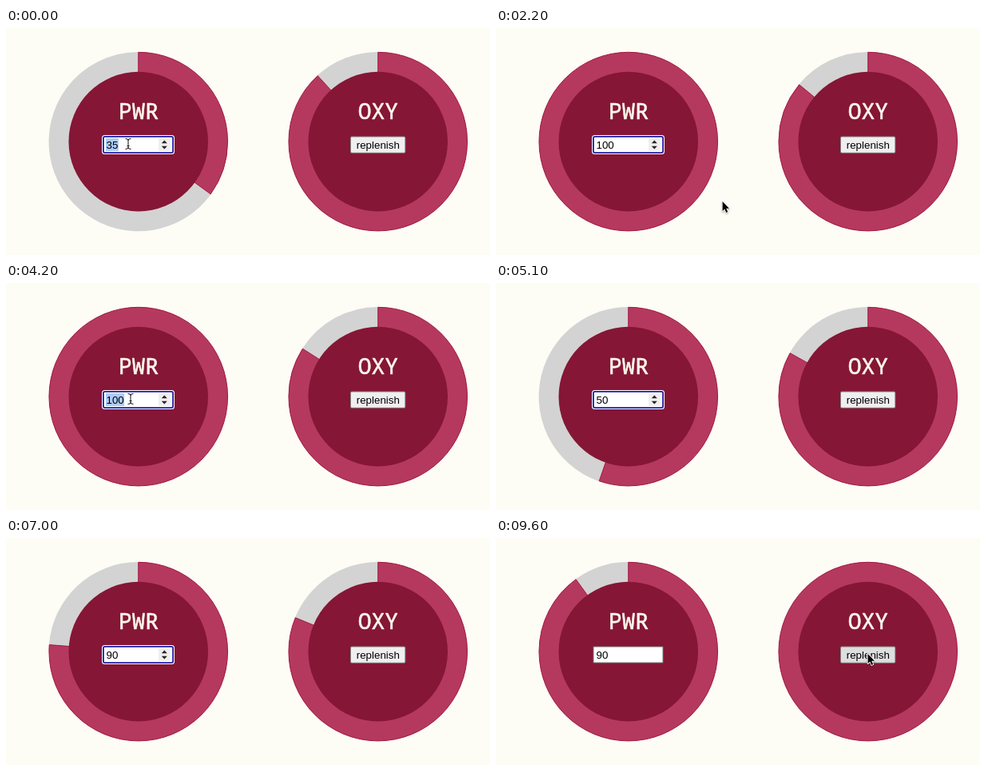
An HTML page with a canvas that plays this animation: 606x284 px, repeating every 9.7 s.

```html
<!DOCTYPE html>
<html lang="en">
<head>
<meta charset="utf-8">
<title>Gauges</title>
<style>
  html, body { margin: 0; height: 100%; overflow: hidden; background: #fdfcf5; }
  canvas { display: block; }
</style>
</head>
<body>
<canvas id="stage" width="606" height="284"></canvas>
<script>
const ctx = document.getElementById('stage').getContext('2d');
const LOOP = 9.7, CY = 142.1;

// Typed values: [second, value]
const typed = [[0.4, 1], [0.6, 10], [0.8, 100], [4.25, 5], [4.68, 50], [6.05, 9], [6.28, 90]];
const selections = [[0, 0.4], [3.85, 4.25], [5.75, 6.05]];
const refill = 8.5;

// Pointer trips: visible span, then [second, x, y] stops
const trips = [
  { from: 0, to: 0.4, stops: [[0, 153, 145]] },
  { from: 1.8, to: 4.25, stops: [[1.8, 153, 145], [2.2, 283, 216], [3.2, 283, 216], [3.7, 156, 145]] },
  { from: 5.35, to: 6.05, stops: [[5.35, 156, 145]] },
  { from: 7.3, to: LOOP, stops: [[7.3, 156, 145], [8, 470, 143], [8.6, 470, 143], [9.2, 465, 144]] }
];

// Each new value starts a one-second linear transition from the current level
function level(start, steps, t) {
  let from = start, to = start, since = 0;
  const at = s => from + (to - from) * Math.min(1, s - since);
  for (const [when, value] of steps) {
    if (when > t) break;
    from = at(when);
    to = value;
    since = when;
  }
  return at(t);
}

function pointerAt(t) {
  const trip = trips.find(p => t >= p.from && t < p.to);
  if (!trip) return null;
  const { stops } = trip;
  const next = stops.findIndex(s => s[0] > t);
  if (next < 0) return stops[stops.length - 1].slice(1);
  const a = stops[next - 1], b = stops[next];
  const k = (t - a[0]) / (b[0] - a[0]), e = k * k * (3 - 2 * k);
  return [a[1] + (b[1] - a[1]) * e, a[2] + (b[2] - a[2]) * e];
}

function box(x, y, w, h, r, fill) {
  ctx.fillStyle = fill;
  ctx.beginPath();
  ctx.roundRect(x, y, w, h, r);
  ctx.fill();
}

function shape(points, fill) {
  ctx.fillStyle = fill;
  ctx.beginPath();
  points.forEach(p => ctx.lineTo(...p));
  ctx.closePath();
  ctx.fill();
}

function text(str, x, y, font, color, align = 'left') {
  ctx.font = font;
  ctx.fillStyle = color;
  ctx.textAlign = align;
  ctx.fillText(str, x, y);
}

function sector(cx, r, a, b, fill, edge) {
  ctx.fillStyle = fill;
  ctx.beginPath();
  if (b - a < 1) ctx.moveTo(cx, CY);
  ctx.arc(cx, CY, r, (a - 0.25) * 2 * Math.PI, (b - 0.25) * 2 * Math.PI);
  ctx.closePath();
  ctx.fill();
  if (!edge) return;
  ctx.strokeStyle = edge;
  ctx.lineWidth = 1;
  ctx.lineJoin = 'round';
  ctx.stroke();
}

const TITLE = '#fdf8ec';

function gauge(cx, percent, label) {
  const f = percent / 100;
  if (f < 1) sector(cx, 112.2, f, 1, '#d3d3d3');
  sector(cx, 111.8, 0, f, '#b5395e', '#a01545');
  sector(cx, 87.3, 0, 1, '#851636');
  text(label, cx + 0.2, 114, '28px "Noto Sans Mono", monospace', TITLE, 'center');
  ctx.strokeStyle = TITLE;
  ctx.lineWidth = 0.6;
  ctx.strokeText(label, cx + 0.2, 114);
}

const UI = '13.333px "Liberation Sans", Arial, sans-serif';

function numberInput(value, focused, selected) {
  if (focused) {
    box(120, 134, 91, 24, 3.5, '#fff');
    box(121, 135, 89, 22, 3, '#1a1aa6');
    box(122.8, 136.8, 85.4, 18.4, 1, '#fff');
    box(191, 138, 15, 16, 0, '#efefef');
    shape([[194.8, 144.3], [198.3, 140.5], [201.8, 144.3]], '#222');
    shape([[194.8, 147.7], [198.3, 151.5], [201.8, 147.7]], '#222');
  } else {
    box(121.5, 135.5, 88, 21, 1, '#767676');
    box(122.5, 136.5, 86, 19, 0, '#fff');
  }
  if (selected) box(125, 138, ctx.measureText(value).width + 1, 16, 0, '#accdf8');
  text(value, 125.5, 150.5, UI, '#000');
}

function button(hovered) {
  box(431, 135.5, 69.3, 21.2, 2, '#858585');
  box(432, 136.5, 67.3, 19.2, 1, hovered ? '#dedede' : '#efefef');
  text('replenish', 465.8, 150.5, UI, '#000', 'center');
}

function iBeam() {
  const beam = new Path2D('M-3.5 -6.5Q0 -6.5 0 -4.5Q0 -6.5 3.5 -6.5M0 -5V5M-3.5 6.5Q0 6.5 0 4.5Q0 6.5 3.5 6.5M-1.5 2.5H1.5');
  for (const [width, color] of [[2.4, 'rgba(255,255,255,.6)'], [1, '#111']]) {
    ctx.lineWidth = width;
    ctx.strokeStyle = color;
    ctx.stroke(beam);
  }
}

function arrow() {
  const outline = new Path2D('M.6 .9V13L3.3 10.4L5.2 15L7.2 14.1L5.3 9.7H9Z');
  ctx.lineWidth = 1.8;
  ctx.lineJoin = 'round';
  ctx.strokeStyle = '#fff';
  ctx.shadowColor = 'rgba(0,0,0,.35)';
  ctx.shadowBlur = 2;
  ctx.shadowOffsetY = 1;
  ctx.stroke(outline);
  ctx.shadowColor = 'transparent';
  ctx.fillStyle = '#000';
  ctx.fill(outline);
}

const within = ([x, y], left, right) => x > left && x < right && y > 135 && y < 157;

function draw(t) {
  ctx.fillStyle = '#fdfcf5';
  ctx.fillRect(0, 0, 606, 284);

  const pointer = pointerAt(t);
  const last = typed.filter(s => s[0] <= t).pop();
  const oxygen = 88.2 - Math.min(t, refill);

  gauge(165.75, level(35, typed, t), 'PWR');
  gauge(465.75, level(oxygen, [[refill, 100]], t), 'OXY');

  ctx.font = UI;
  numberInput(String(last ? last[1] : 35), t < refill, selections.some(([a, b]) => t >= a && t < b));
  button(pointer && within(pointer, 431, 500));

  if (pointer) {
    ctx.save();
    ctx.translate(...pointer);
    if (within(pointer, 122, 190)) iBeam(); else arrow();
    ctx.restore();
  }
}

function tick() {
  draw(performance.now() / 1000 % LOOP);
  requestAnimationFrame(tick);
}
tick();
</script>
</body>
</html>
```
